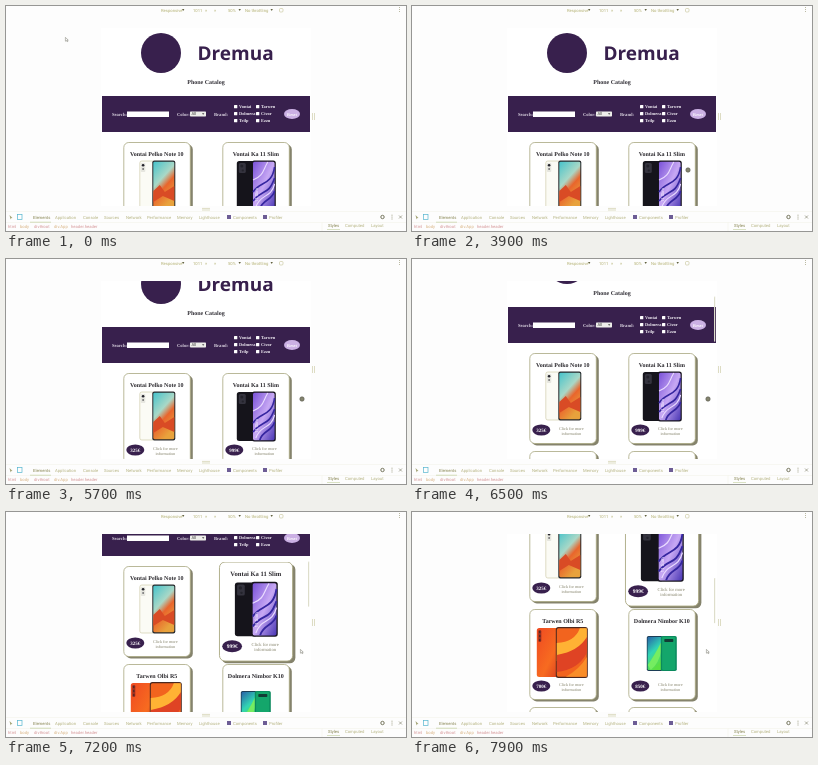
An HTML page for the animation above (8 s loop, 400 by 225 pixels).

```html
<!DOCTYPE html>
<html lang="en">
<head>
<meta charset="utf-8">
<title>Phone Catalog</title>
<style>
@property --scroll { syntax: "<number>"; inherits: true; initial-value: 0; }
html, body { margin: 0; width: 100%; height: 100%; overflow: hidden; background: #fdfdfd; }
svg { display: block; width: 100%; height: 100%; animation: scroll 8s infinite; }
text { text-rendering: geometricPrecision; }
.serif { font-family: "Liberation Serif", serif; }
.bold { font-weight: 700; }
.ui { font-family: Roboto, sans-serif; font-size: 4.2px; }
.brand { font: 600 19px "Noto Sans", sans-serif; }
#page { transform: translateY(calc(var(--scroll) * -1px)); }
#thumb { transform: translateY(calc(var(--scroll) * .3px)); animation: thumb 8s infinite; }
#hovered { transform-origin: 250px 181px; animation: hover 8s infinite; }
#cursor { animation: move 8s infinite; }
#arrow { animation: arrow 8s step-end infinite; }
#touch { animation: touch 8s step-end infinite; }
@keyframes scroll {
  0%, 57.5% { --scroll: 0; animation-timing-function: steps(6); }
  65% { --scroll: 22; }
  75% { --scroll: 22; animation-timing-function: steps(5); }
  81.25% { --scroll: 42; animation-timing-function: steps(3); }
  85% { --scroll: 60; }
  86.25% { --scroll: 60; animation-timing-function: steps(3); }
  90% { --scroll: 82; animation-timing-function: steps(2); }
  92.5% { --scroll: 98; }
  95% { --scroll: 98; animation-timing-function: steps(3); }
  98.75%, 100% { --scroll: 137; }
}
@keyframes hover {
  0%, 86.25% { transform: scale(1); animation-timing-function: steps(3); }
  90%, 100% { transform: scale(1.1); }
}
@keyframes thumb {
  0% { opacity: 0; animation-timing-function: step-end; }
  58.75% { opacity: 1; }
  66.25% { opacity: 1; animation-timing-function: steps(4); }
  71.25% { opacity: 0; animation-timing-function: step-end; }
  76.25%, 100% { opacity: 1; }
}
@keyframes move {
  0%, 18.75% { transform: translate(59px, 31px); animation-timing-function: steps(3); }
  22.5% { transform: translate(239px, 74px); }
  23.75% { transform: translate(239px, 74px); animation-timing-function: steps(3); }
  27.5% { transform: translate(357px, 95px); animation-timing-function: step-end; }
  32.5% { transform: translate(30px, 57px); }
  36.25% { transform: translate(30px, 57px); animation-timing-function: steps(3); }
  40% { transform: translate(1px, 74px); animation-timing-function: steps(2); }
  42.5% { transform: translate(70px, 83px); animation-timing-function: steps(2); }
  45% { transform: translate(190px, 82px); }
  46.25% { transform: translate(190px, 82px); animation-timing-function: steps(2); }
  48.75% { transform: translate(276px, 164px); }
  50% { transform: translate(276px, 164px); animation-timing-function: steps(2); }
  52.5%, 86.25% { transform: translate(296px, 140px); animation-timing-function: step-end; }
  87.5%, 100% { transform: translate(294px, 137px); }
}
@keyframes arrow { 0% { opacity: 1; } 47.5% { opacity: 0; } 87.5%, 100% { opacity: 1; } }
@keyframes touch { 0% { opacity: 0; } 47.5% { opacity: 1; } 87.5%, 100% { opacity: 0; } }
</style>
</head>
<body>
<svg viewBox="0 0 400 225" preserveAspectRatio="none">
  <defs>
    <clipPath id="view"><rect x="95" y="22" width="210" height="178"/></clipPath>
    <linearGradient id="sunset" x2=".5" y2="1">
      <stop stop-color="#46c3cb"/><stop offset=".45" stop-color="#a9d8c7"/>
      <stop offset=".65" stop-color="#e9652c"/><stop offset="1" stop-color="#e8a23c"/>
    </linearGradient>
    <linearGradient id="violet" x2="1" y2="1">
      <stop stop-color="#7a52d8"/><stop offset=".5" stop-color="#c7a8f4"/><stop offset="1" stop-color="#4936b4"/>
    </linearGradient>
    <linearGradient id="ember" x2="1" y2="1">
      <stop stop-color="#ef4a22"/><stop offset=".6" stop-color="#f76b20"/><stop offset="1" stop-color="#d83a20"/>
    </linearGradient>
    <linearGradient id="mint" x2=".4" y2="1">
      <stop stop-color="#2862a8"/><stop offset=".5" stop-color="#31d4b4"/><stop offset="1" stop-color="#5be043"/>
    </linearGradient>
  </defs>
  <rect width="400" height="225" fill="#fdfdfd"/>
  <g id="tools"></g>
  <g clip-path="url(#view)">
    <rect x="95" y="22" width="210" height="178" fill="#fff"/>
    <g id="page"></g>
    <rect id="thumb" x="302" y="25" width="1.2" height="45" rx=".6" fill="#dedecb"/>
  </g>
  <g id="cursor">
    <path id="arrow" d="M.4 .4v3.8l1-.8.7 1.4.7-.4-.7-1.3h1.2z" fill="#fff" stroke="#77776a" stroke-width=".5"/>
    <circle id="touch" r="2.2" fill="#85856f" stroke="#55554a" stroke-width=".6"/>
  </g>
</svg>
<script>
const PURPLE = "#38204d";
const byId = id => document.getElementById(id);
const rect = (x, y, w, h, fill, extra = "") =>
  `<rect x="${x}" y="${y}" width="${w}" height="${h}" fill="${fill}" ${extra}/>`;
const label = (x, y, size, fill, str, anchor = "start", cls = "serif bold") =>
  `<text x="${x}" y="${y}" font-size="${size}" fill="${fill}" text-anchor="${anchor}" class="${cls}">${str}</text>`;
const ui = (x, y, str, fill = "#b3b072") => label(x, y, 4.2, fill, str, "start", "ui");
const path = (d, fill, stroke = "none", width = 1) =>
  `<path d="${d}" fill="${fill}" stroke="${stroke}" stroke-width="${width}"/>`;
const lens = (x, y, r = .8) => `<circle cx="${x}" cy="${y}" r="${r}" fill="#23232b"/>`;

// Phones are drawn relative to the top centre of their card.
const phones = [
  rect(-17, 19, 15, 48, "#fbfbf5", 'rx="2" stroke="#c9c7a0" stroke-width=".6"') +
  rect(-16, 21, 4.5, 9, "#e6e6df", 'rx="1"') + lens(-13.7, 23.3, 1.3) + lens(-13.7, 27) +
  rect(-4.5, 18.5, 23, 49, "#26292c", 'rx="2"') +
  rect(-3.5, 19.7, 21, 46.5, "url(#sunset)", 'rx="1.4"') +
  path("M-3.5 49L3 43 8 50 17.5 44V59L6 54-3.5 60z", "#d94b25"),

  rect(-19, 19, 21, 49, "#15141b", 'rx="2.5"') +
  rect(-17, 21, 7, 10, "#34333e", 'rx="1.5"') + lens(-14, 24, 1.5) + lens(-13, 28.5, 1.1) +
  rect(-4, 18.5, 24, 50, "#17141e", 'rx="2.5"') +
  rect(-2.8, 19.8, 21.6, 47.4, "url(#violet)", 'rx="1.6"') +
  path("M-2.8 50C4 39 16 44 18.8 25M-2.8 59C7 46 12 55 18.8 36M4 67C7 57 16 59 18.8 49", "none", "#3526a0", 1.7) +
  path("M-2.8 38C8 34 7 28 12 20M0 65C5 51 15 57 18.8 42", "none", "#eadcff", 1.1) +
  `<g transform="translate(2 60) rotate(-90)">${label(0, 0, 5.5, "#fff", "11 Slim", "start", "ui")}</g>`,

  rect(-26, 19, 24, 49, "url(#ember)", 'rx="2.5"') +
  rect(-24.5, 21, 3, 12, "#9c3020", 'rx="1.3"') + lens(-23, 23) + lens(-23, 27) + lens(-23, 31) +
  rect(-7, 18, 32, 51, "#4a281f", 'rx="2.5"') +
  rect(-6, 19.2, 30, 48.6, "#f2641e", 'rx="1.7"') +
  path("M-6 34Q12 33 17 19.2H24V29Q18 50-6 52z", "#ffb234") +
  path("M-6 46Q16 42 24 28V44Q15 61-6 63z", "#df4324") +
  path("M3 67.8Q17 60 24 48V67.8z", "#f98d28"),

  rect(-15, 27, 16, 35, "#1c3e56", 'rx="1.7"') +
  rect(-14.2, 28, 14.4, 33, "url(#mint)", 'rx="1.2"') +
  path("M-14 56Q-7 46 0 32V40Q-3 55-11 61z", "#75ed61") +
  rect(-1, 27, 16, 35, "#0b8a5e", 'rx="1.7"') +
  rect(.3, 28, 13.2, 33, "#14a66b", 'rx="1.2"') +
  rect(2.5, 30, 9, 3, "#123c35", 'rx=".8"')
];

function card(cx, top, phone, title, price) {
  const body = title ? label(0, 13.5, 6, "#2d2b30", title, "middle") + phones[phone] +
    `<ellipse cx="-21.5" cy="77" rx="9" ry="5.5" fill="${PURPLE}"/>` +
    label(-21.5, 78.8, 5, "#fff", price, "middle") +
    label(8.5, 77, 4.2, "#85836b", "Click for more", "middle", "serif") +
    label(8.5, 81.5, 4.2, "#85836b", "information", "middle", "serif") : "";
  return `<g transform="translate(${cx} ${top})">` +
    rect(-31, 2.5, 67, 90, "#85836c", 'rx="5"') +
    rect(-33, .5, 66.5, 90, "#fff", 'rx="5" stroke="#a9a780" stroke-width=".8"') + body + "</g>";
}

function banner() {
  const ink = "#d9d2df";
  const brands = [["Vontai", "Tarwen"], ["Dolmera", "Civor"], ["Trilp", "Ezzu"]];
  let out = rect(96, 90, 208, 36, PURPLE) +
    label(106, 109.5, 4.6, ink, "Search:") + rect(121, 105.5, 42, 5.5, "#fff") +
    label(171, 109.5, 4.6, ink, "Color:") + rect(184, 105.5, 16, 5, "#eeeeea", 'rx=".7"') +
    label(185.5, 109.4, 3.5, "#444", "All", "start", "ui") + path("M196 107.2h2.4l-1.2 1.5z", "#444") +
    label(208, 109.5, 4.6, ink, "Brand:");
  brands.forEach((row, r) => row.forEach((name, c) => {
    const x = 228 + c * 22, y = 99 + r * 7;
    out += rect(x, y, 3.3, 3.3, "#fff", 'rx=".5"') + label(x + 5, y + 3.4, 4.4, "#f1edf4", name);
  }));
  return out + '<ellipse cx="286" cy="108" rx="8" ry="5" fill="#cbb0e4"/>' +
    label(286, 109.5, 4.2, "#fff", "Reset", "middle");
}

byId("page").innerHTML =
  `<circle cx="155" cy="47" r="20" fill="${PURPLE}"/>` +
  label(191.5, 54, 19, PURPLE, "Dremua", "start", "brand") +
  label(200, 78, 6, "#333138", "Phone Catalog", "middle") + banner() +
  card(150.8, 234, 2, "Tarwen Olbi R5", "700€") +
  card(249.8, 234, 3, "Dolmera Nimbor K10", "850€") +
  card(150.8, 332) + card(249.8, 332) +
  card(150.8, 136, 0, "Vontai Pelko Note 10", "325€") +
  `<g id="hovered">${card(249.8, 136, 1, "Vontai Ka 11 Slim", "999€")}</g>`;

function tools() {
  const arrow = x => path(`M${x} 3h2.4l-1.2 2z`, "#62623f");
  const tabs = [[27, "Elements"], [49, "Application"], [77, "Console"], [98, "Sources"], [120, "Network"],
    [141, "Performance"], [171, "Memory"], [193, "Lighthouse"], [227, "Components"], [263, "Profiler"]];
  const crumbs = [[2, "html"], [14, "body"], [28, "div#root"], [48, "div.App"], [65, "header.header"]];
  const panes = [[322, "Styles"], [339, "Computed"], [365, "Layout"]];
  return ui(155, 5.6, "Responsive") + arrow(176) + ui(187, 5.6, "1011") + ui(199, 5.6, "×") + ui(208, 5.6, "×") +
    ui(222, 5.6, "50%") + arrow(232.5) + ui(239, 5.6, "No throttling") + arrow(264.5) +
    rect(273.5, 2.5, 3.5, 3.5, "none", 'rx="1" stroke="#b9b780" stroke-width=".5"') +
    path("M393.5 1v1M393.5 3v1M393.5 5v1", "none", "#aaa98c", .8) +
    path("M306.5 107v7M308.5 107v7M196 202.4h8M196 204h8", "none", "#c8c69c", .6) +
    path("M0 205.5h400M0 216.5h400M316 216.5V225", "none", "#f0f0e6", .5) +
    path("M3.5 209l3 3-1.5.2-.5 1.3z", "#a6a678") +
    rect(11.5, 208.5, 4.5, 5, "none", 'stroke="#55b5cf" stroke-width=".7"') +
    tabs.map(([x, name], i) => ui(x, 212.5, name, i ? "#b5b380" : "#85834f")).join("") +
    path("M24 216.2h21", "none", "#c2cf9c", .7) +
    rect(221, 209, 4, 4, "#6d5d95") + rect(257, 209, 4, 4, "#6d5d95") +
    crumbs.map(([x, name], i) => ui(x, 222.2, name, i % 2 ? "#d8b282" : "#d59698")).join("") +
    panes.map(([x, name], i) => ui(x, 221, name, i ? "#b5b380" : "#85834f")).join("") +
    path("M321 223.5h13", "none", "#c2cf9c", .6) +
    '<circle cx="376.5" cy="211" r="1.7" fill="none" stroke="#74745c" stroke-width="1"/>' +
    path("M386 208.7v1M386 210.6v1M386 212.5v1", "none", "#8e8e70", .8) +
    path("M393 209.5l3 3M396 209.5l-3 3", "none", "#777760", .6);
}
byId("tools").innerHTML = tools();
</script>
</body>
</html>
```
